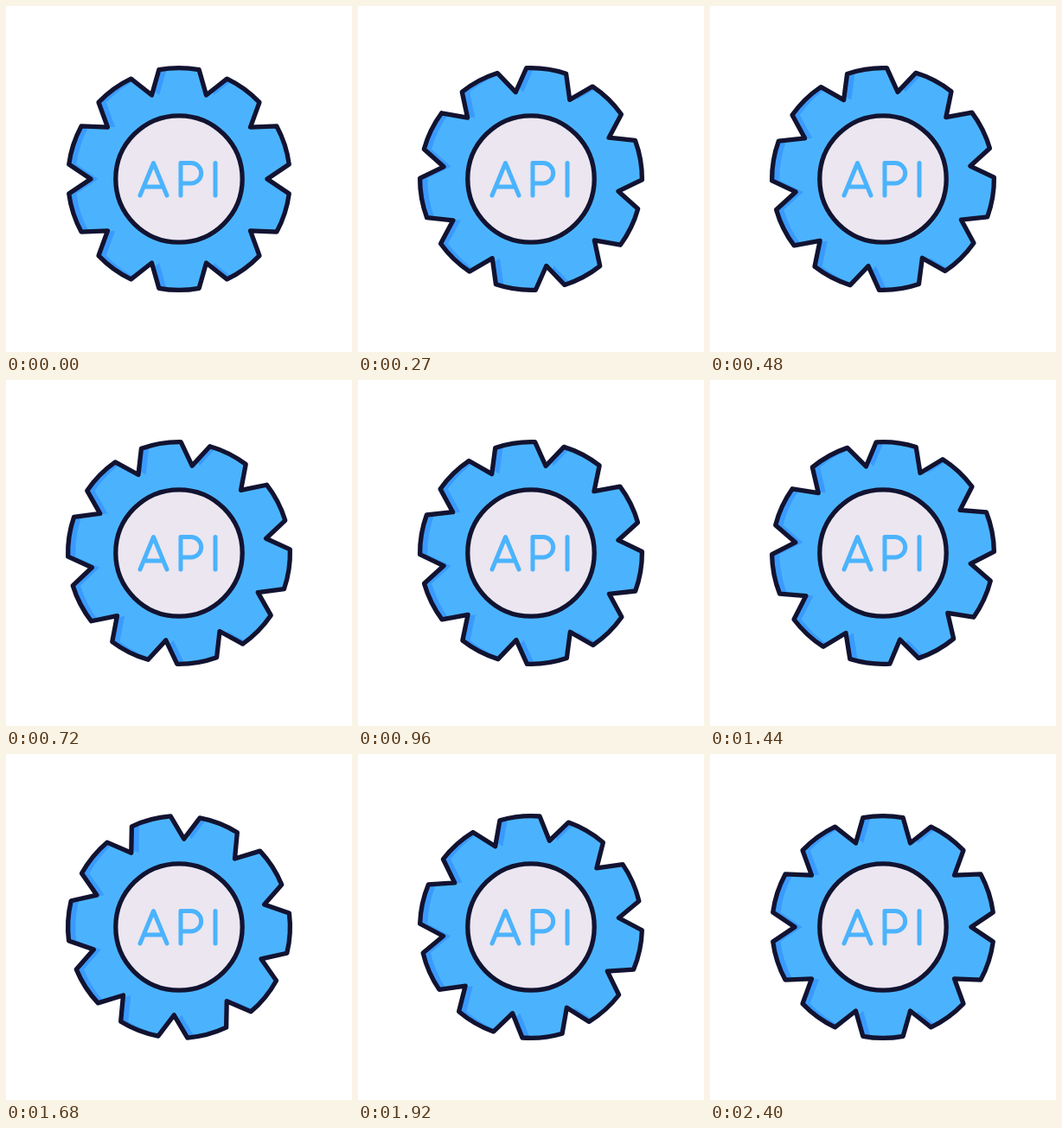
Animation of 400 by 400 pixels, one loop 4430 ms. Source, as an HTML page:

```html
<!DOCTYPE html>
<html lang="en">
<head>
<meta charset="utf-8">
<title>API gear</title>
<style>
html, body { margin: 0; width: 100%; height: 100%; overflow: hidden; background: #fff; }
svg { display: block; width: 100vw; height: 100vh; }
.line { fill: none; stroke: #121331; stroke-width: 5.3; stroke-linejoin: round; }
.word { fill: none; stroke: #4bb3fd; stroke-width: 5; stroke-linecap: round; stroke-linejoin: round; }
</style>
</head>
<body>
<svg viewBox="-200 -200 400 400" role="img" aria-label="API">
  <defs>
    <clipPath id="inside"><path class="gear"/></clipPath>
  </defs>
  <path class="gear" fill="#3a9aff"/>
  <g clip-path="url(#inside)">
    <g transform="translate(8.7 0)"><path class="gear" fill="#4bb3fd"/></g>
  </g>
  <path class="gear line"/>
  <circle r="73.2" fill="#ebe6ef" class="hub"/>
  <circle r="73.2" class="line"/>
  <g class="word">
    <path d="M-45 19 L-29.5 -18.5 L-14 19 M-39.5 9 H-19.5"/>
    <path d="M2 19 V-18.5 H14 A11.7 11.7 0 0 1 14 4.9 H2"/>
    <path d="M42 -18.5 V19"/>
  </g>
</svg>
<script>
const LOOP = 4430, SPIN = 2385, STEP = 30, TURN = 180;
const TEETH = 10, OUTER = 128.4, INNER = 102, HALF = 10.4;

// Point at a clockwise angle from the top, in degrees.
function polar(r, deg) {
  const a = deg * Math.PI / 180;
  return (r * Math.sin(a)).toFixed(2) + ' ' + (-r * Math.cos(a)).toFixed(2);
}

function gearPath() {
  const pitch = 360 / TEETH;
  let d = '';
  for (let i = 0; i < TEETH; i++) {
    const mid = i * pitch;
    d += (i ? 'L' : 'M') + polar(INNER, mid - pitch / 2) +
      'L' + polar(OUTER, mid - HALF) +
      `A${OUTER} ${OUTER} 0 0 1 ` + polar(OUTER, mid + HALF);
  }
  return d + 'Z';
}

// Cubic Bezier ease (1/3, 0, 1/3, 1), solved by bisection.
function ease(x) {
  if (x >= 1) return 1;
  let lo = 0, hi = 1;
  for (let i = 0; i < 30; i++) {
    const s = (lo + hi) / 2;
    if (s - s * s + s * s * s < x) lo = s; else hi = s;
  }
  return lo * lo * (3 - 2 * lo);
}

const gears = document.querySelectorAll('.gear');
const shape = gearPath();
gears.forEach(g => g.setAttribute('d', shape));

const start = performance.now();

function draw(now) {
  const t = Math.max(0, now - start) % LOOP;
  const held = Math.floor(t / STEP) * STEP;
  const angle = TURN * ease(held / SPIN);
  gears.forEach(g => g.setAttribute('transform', `rotate(${angle.toFixed(3)})`));
  requestAnimationFrame(draw);
}
draw(start);
</script>
</body>
</html>
```
